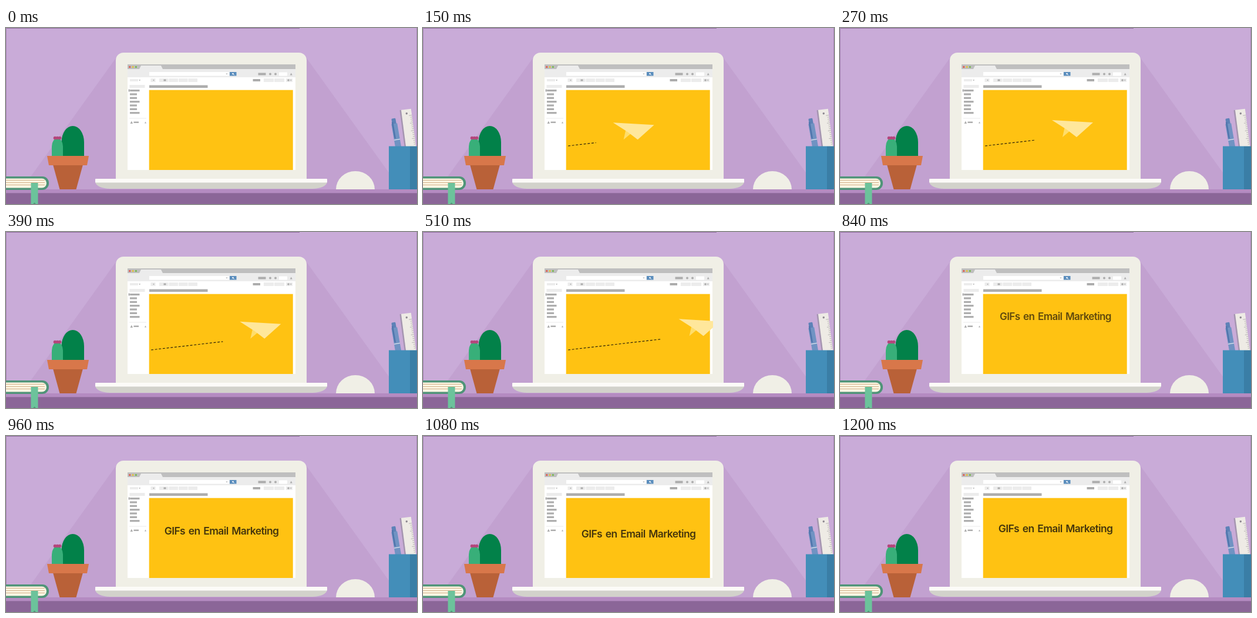
Write an HTML page with a canvas that moves like this. It is 700 by 300 pixels and loops after 2350 ms.

```html
<!DOCTYPE html>
<html lang="es">
<head>
<meta charset="utf-8">
<title>GIFs en Email Marketing</title>
<style>
html, body { margin: 0; width: 100%; height: 100%; overflow: hidden; background: #c9abd8; }
canvas { display: block; width: 700px; height: 300px; }
</style>
</head>
<body>
<canvas id="stage" width="700" height="300"></canvas>
<script>
const LOOP = 2350, STEP = 30, REST = 1200;
const SPEED = 0.311, SLOPE = -0.116, ERASE = 1.18;
const TITLE_IN = 660, TITLE_LOW = 1020;
const GREY = '#adadad', PALE = '#ececec', CREAM = '#f0efe6', EDGE = '#a987b8';

const stage = document.getElementById('stage').getContext('2d');
let ctx = stage;

// Linear move from a to b between times t0 and t1, held outside.
function ramp(t, t0, t1, a, b) {
  const k = Math.max(0, Math.min(1, (t - t0) / (t1 - t0)));
  return a + (b - a) * k;
}

function rect(color, x, y, w, h) {
  ctx.fillStyle = color;
  ctx.fillRect(x, y, w, h);
}

function round(color, x, y, w, h, radii) {
  ctx.fillStyle = color;
  ctx.beginPath();
  ctx.roundRect(x, y, w, h, radii);
  ctx.fill();
}

function dot(color, x, y, r) {
  ctx.fillStyle = color;
  ctx.beginPath();
  ctx.arc(x, y, r, 0, Math.PI * 2);
  ctx.fill();
}

function poly(color, ...pts) {
  ctx.fillStyle = color;
  ctx.beginPath();
  for (let i = 0; i < pts.length; i += 2) ctx.lineTo(pts[i], pts[i + 1]);
  ctx.fill();
}

function trapezoid(color, cx, y, top, bottom, h) {
  poly(color, cx - top / 2, y, cx + top / 2, y, cx + bottom / 2, y + h, cx - bottom / 2, y + h);
}

function line(color, width, x1, y1, x2, y2) {
  ctx.strokeStyle = color;
  ctx.lineWidth = width;
  ctx.beginPath();
  ctx.moveTo(x1, y1);
  ctx.lineTo(x2, y2);
  ctx.stroke();
}

function tilted(x, y, angle, draw) {
  ctx.save();
  ctx.translate(x, y);
  ctx.rotate(angle);
  draw();
  ctx.restore();
}

function drawRoom() {
  rect('#c9abd8', 0, 0, 700, 275);
  trapezoid('#c2a1d0', 349.5, 48, 320, 646, 227);
  rect('#8f6c9e', 0, 0, 500, 1);
  rect(EDGE, 0, 0, 1, 275);
  rect(EDGE, 699, 0, 1, 275);
  rect('#b48bc1', 0, 275, 700, 6.5);
  rect('#8b6698', 0, 281.5, 700, 18.5);
}

function drawCactus() {
  const stem = (color, x, y, w) => {
    const r = { x: w / 2, y: w * 0.72 };
    round(color, x, y, w, 219 - y, [r, r, 0, 0]);
  };
  stem('#028149', 94.5, 167, 38.5);
  stem('#38af79', 78, 188, 19);
  for (let i = -1; i <= 1; i++) dot('#b4467c', 87.5 + i * 4, 187.5, 2.8);
  trapezoid('#b96138', 105.5, 233, 51, 28, 42);
  trapezoid('#d8774a', 105.5, 218, 71, 65, 16);
}

function drawBook() {
  round('#4f9478', -20, 253, 93, 23, 11);
  round('#fbf5e2', -20, 256.5, 89, 16, 8);
  for (let y = 259.5; y < 270; y += 4) line('#d3b08a', 1, 0, y, 66, y);
  rect('#6cc39b', 42.5, 264, 12, 36);
  trapezoid('#4f9478', 48.5, 297.5, 0, 5, 2.5);
}

function drawRuler() {
  rect('#a595b0', -1.5, 0, 3, 66);
  rect('#eeebe5', 1, 0, 17, 66);
  dot('#8f8a92', 9.5, 7, 1.7);
  for (let i = 0; i < 16; i++) line('#a9a4a6', 0.8, i % 4 ? 15 : 13, 11 + i * 3.3, 18, 11 + i * 3.3);
}

function drawPen() {
  round('#5d82b7', 1.5, -1, 7, 12, 1.5);
  rect('#7093c3', 0, 8, 10, 42);
  rect('#4f75ac', 1, 5, 2.5, 28);
  rect('#dfe5ee', 0, 35, 10, 1.2);
}

function drawCup() {
  tilted(672, 140, -0.13, drawRuler);
  tilted(655, 156, -0.17, drawPen);
  rect('#438eb9', 652, 201.5, 36, 73.5);
  rect('#3a7ea6', 688, 201.5, 12, 73.5);
}

function drawLaptop() {
  round(CREAM, 187, 42, 325, 220, [13, 13, 0, 0]);
  const corner = { x: 25, y: 12 };
  round('#d2d2cb', 152, 260, 395, 14, [0, 0, corner, corner]);
  round('#fcfbf8', 152, 257, 395, 6.5, 1);
}

function drawMouse() {
  ctx.fillStyle = CREAM;
  ctx.beginPath();
  ctx.ellipse(595, 275, 33, 31, 0, Math.PI, 0);
  ctx.fill();
}

function drawBrowser() {
  const bar = (x, y, w, h, color = GREY) => rect(color, x, y, w, h);
  const chips = (x, count, step) => {
    for (let i = 0; i < count; i++) bar(x + i * step, 86, step - 1, 6, PALE);
  };
  const arrow = (x, y) => trapezoid(GREY, x, y, 3, 0, 2);
  const peak = (x, y, size) => trapezoid(GREY, x, y, 0, size, size);

  rect('#fff', 207, 62, 286, 180);

  // Tab strip and address row
  bar(207, 62, 286, 8, '#bfbfbf');
  trapezoid(PALE, 247, 64, 34, 40, 6);
  ['#dd5a50', '#e3c13f', '#74b84f'].forEach((c, i) => dot(c, 210.8 + i * 5.3, 66.4, 1.6));
  bar(207, 70, 286, 14, PALE);
  bar(244, 75, 136, 6.5, '#fff');
  arrow(376, 77.5);
  bar(381, 75, 11.5, 6.5, '#5a8dbd');
  dot('#fff', 386.5, 78, 1.3);
  line('#fff', 1, 387, 78.5, 388.8, 80.3);
  bar(429.5, 76.5, 13, 4);
  dot(GREY, 450, 78.5, 2);
  dot(GREY, 459, 78.5, 2);
  bar(465, 75.5, 14, 6, '#fff');
  peak(485.7, 76.5, 4);

  // Mail toolbar
  bar(211, 87, 14, 4, PALE);
  arrow(227.7, 88.3);
  chips(246.5, 1, 9);
  chips(261, 4, 16.5);
  chips(439, 2, 18);
  chips(477, 1, 12);
  dot(GREY, 251.5, 89, 1);
  bar(268.5, 87.5, 4, 3);
  bar(420.5, 87, 12.5, 4);
  dot(GREY, 481, 89, 1.8);
  arrow(485.2, 88.3);

  // Folders and message
  bar(210.5, 97, 26, 5, PALE);
  bar(244, 97.5, 99.5, 4.5);
  for (let i = 0; i < 7; i++) bar(211, 105 + i * 6.35, 13.5 + 3 * Math.cos(i * 2.1), 3.2);
  bar(209, 104.5, 1.2, 4, '#777');
  bar(210, 153.5, 29, 1, PALE);
  peak(213.8, 158.5, 4.5);
  bar(217.5, 159.5, 8.5, 2.5);
  peak(237.5, 159.5, 3);
  bar(243.7, 105.7, 245, 136.3, '#ffc212');
}

function drawTrail(t) {
  const from = 247 + Math.max(0, t - 540) * ERASE;
  const to = 248 + t * SPEED;
  if (from >= to) return;
  const y = x => 201 + (x - 247) * SLOPE;
  ctx.save();
  ctx.setLineDash([4, 2.7]);
  ctx.lineDashOffset = Math.hypot(from - 247, y(from) - 201);
  line('#2e2408', 1.2, from, y(from), to, y(to));
  ctx.restore();
}

function drawPlane(t) {
  const d = t * SPEED;
  ctx.save();
  ctx.beginPath();
  ctx.rect(207, 62, 287, 180);
  ctx.clip();
  ctx.translate(277 + d, 166.7 + d * SLOPE);
  poly('#ffdd6a', 22, 11, 18, 29, 30, 19);
  poly('#ffe79b', 0, 0, 70, 4, 42, 29, 25, 16);
  ctx.restore();
}

// Drops in below its resting line, then rises back to it.
function drawTitle(t) {
  const y = t < TITLE_LOW ? ramp(t, TITLE_IN, TITLE_LOW, 122.5, 177) : ramp(t, TITLE_LOW, REST, 177, 163.5);
  const scale = ramp(t, TITLE_IN, 960, 0.94, 1);
  ctx.save();
  ctx.globalAlpha = ramp(t, TITLE_IN, 870, 0, 1);
  ctx.translate(367, y);
  ctx.scale(scale, scale);
  ctx.font = '600 17.5px Inter, sans-serif';
  ctx.letterSpacing = '-0.65px';
  ctx.wordSpacing = '2px';
  ctx.textAlign = 'center';
  ctx.fillStyle = '#46360c';
  ctx.fillText('GIFs en Email Marketing', 0, 0);
  ctx.restore();
}

// The still scene is painted once and reused.
function paintScene() {
  const layer = document.createElement('canvas');
  layer.width = 700;
  layer.height = 300;
  ctx = layer.getContext('2d');
  [drawRoom, drawCactus, drawBook, drawCup, drawLaptop, drawMouse, drawBrowser].forEach(draw => draw());
  ctx = stage;
  return layer;
}

const scene = paintScene();
const start = performance.now();

function frame() {
  const now = (performance.now() - start) % LOOP;
  const t = Math.min(REST, Math.floor(now / STEP) * STEP);
  ctx.drawImage(scene, 0, 0);
  if (t > 0) {
    drawTrail(t);
    drawPlane(t);
  }
  if (t > TITLE_IN) drawTitle(t);
  requestAnimationFrame(frame);
}
frame();
</script>
</body>
</html>
```
